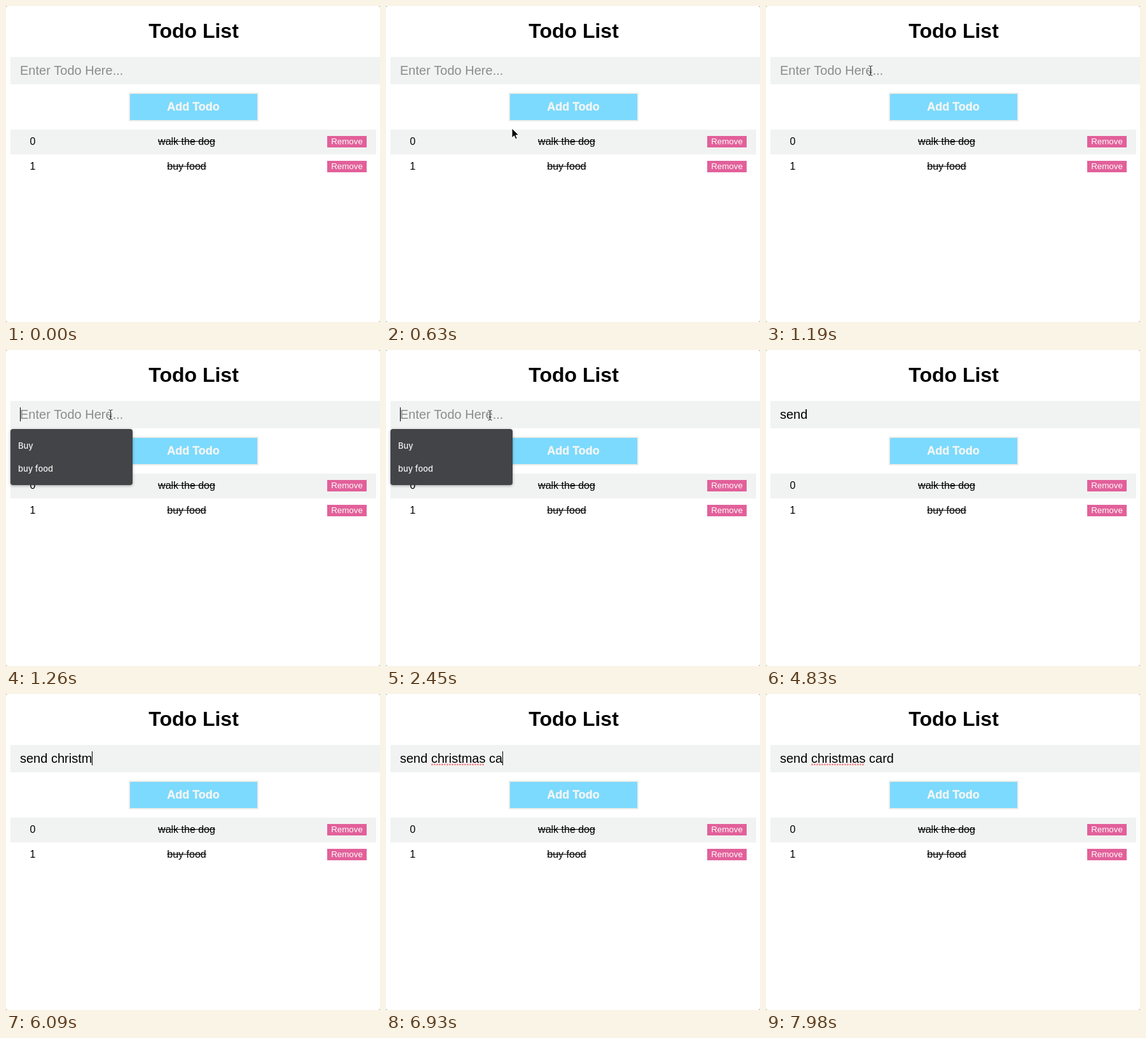
Animation of 588x496 px, one loop 8 s. Source, as an HTML page with a canvas:

```html
<!DOCTYPE html>
<html lang="en">
<head>
<meta charset="utf-8">
<title>Todo List</title>
<style>
  html, body { margin: 0; width: 100%; height: 100%; overflow: hidden; background: #fff; }
  canvas { display: block; }
</style>
</head>
<body>
<canvas id="stage" width="588" height="496"></canvas>
<script>
const ctx = document.getElementById('stage').getContext('2d');
const LOOP = 8000, STEP = 70;
const SANS = '"Liberation Sans", Arial, sans-serif';
const PALE = '#f1f3f2';
const TEXT = 'send christmas card';
const KEYS = [2520, 2660, 2800, 2870, 3270, 5320, 5460, 5600, 5740, 5880,
              5950, 6090, 6230, 6370, 6580, 6790, 6930, 7070, 7340];
const FOCUS = 1260, ENTER = 70, ARRIVE = 1190;

function rect(x, y, w, h, color) {
  ctx.fillStyle = color;
  ctx.fillRect(x, y, w, h);
}

function text(str, x, y, font, color = '#000', align = 'left') {
  ctx.font = font;
  ctx.fillStyle = color;
  ctx.textAlign = align;
  ctx.fillText(str, x, y);
}

function roundRect(x, y, w, h, r, color) {
  ctx.beginPath();
  ctx.roundRect(x, y, w, h, r);
  ctx.fillStyle = color;
  ctx.fill();
}

function row(index, label, y) {
  const font = '16px ' + SANS;
  if (index % 2 === 0) rect(7, y, 575, 39, PALE);
  text(index, 37.6, y + 24, font);
  text(label, 284, y + 24, font, '#000', 'center');
  const w = ctx.measureText(label).width;
  rect(284 - w / 2, y + 18, w, 1, '#000');
  rect(505, y + 10, 62, 18, '#e2609a');
  text('Remove', 536, y + 23, '13.333px ' + SANS, '#fff', 'center');
}

function page() {
  rect(0, 0, 588, 496, '#999');
  roundRect(0, 0, 588, 496, 3, '#fff');
  text('Todo List', 295, 50, 'bold 32px ' + SANS, '#000', 'center');
  rect(7, 80, 581, 43, PALE);
  rect(193, 136, 204, 45, '#e9ebea');
  rect(195, 138, 200, 41, '#7bdafd');
  text('Add Todo', 294.5, 164, 'bold 18px ' + SANS, '#f3f5f4', 'center');
  ctx.strokeStyle = '#f3f5f4';
  ctx.lineWidth = 0.4;
  ctx.strokeText('Add Todo', 294.5, 164);
  row(0, 'walk the dog', 194);
  row(1, 'buy food', 233);
}

function suggestions() {
  ctx.save();
  ctx.shadowColor = 'rgba(0,0,0,.35)';
  ctx.shadowBlur = 4;
  ctx.shadowOffsetY = 1;
  roundRect(7, 124, 192, 88, 4, '#434447');
  ctx.restore();
  const font = '500 13px Inter, sans-serif';
  text('Buy', 19, 155, font, '#f1f1f1');
  text('buy food', 19, 191, font, '#f1f1f1');
}

function field(t) {
  const font = '20px ' + SANS;
  const typed = KEYS.filter(k => k <= t).length;
  const value = TEXT.slice(0, typed);
  if (typed) text(value, 22, 108, font);
  else text('Enter Todo Here...', 22, 108, font, '#8c8c8c');

  // spelling marks appear once the word is finished
  if (typed > 14) {
    ctx.fillStyle = '#f4737a';
    for (let x = 72.5; x < 155; x += 4) {
      ctx.beginPath();
      ctx.arc(x, 110.8, 1.3, 0, 7);
      ctx.fill();
    }
  }

  const last = typed ? KEYS[typed - 1] : FOCUS;
  if (t >= last && Math.floor((t - last) / 500) % 2 === 0) {
    const w = typed ? ctx.measureText(value).width : 0;
    rect(Math.floor(22 + w), 90, 1, 22, '#000');
  }
}

function iBeam(x, y) {
  const path = new Path2D('M-3-7.5H-1.5L0-6.5 1.5-7.5H3M0-6.5V6.5M-3 7.5H-1.5L0 6.5 1.5 7.5H3M-2 2.5H2');
  ctx.save();
  ctx.translate(x + 0.5, y + 0.5);
  ctx.strokeStyle = 'rgba(255,255,255,.8)';
  ctx.lineWidth = 2.4;
  ctx.stroke(path);
  ctx.strokeStyle = '#111';
  ctx.lineWidth = 1;
  ctx.stroke(path);
  ctx.restore();
}

function arrow(x, y) {
  const path = new Path2D('M0 0V15L3.5 11.7 5.8 17 8.2 16 6 10.8H10.8Z');
  ctx.save();
  ctx.translate(x, y);
  ctx.fillStyle = '#000';
  ctx.fill(path);
  ctx.strokeStyle = '#fff';
  ctx.lineWidth = 1;
  ctx.stroke(path);
  ctx.restore();
}

function pointer(t) {
  if (t < ENTER || t >= KEYS[0]) return;
  if (t >= 1400) return iBeam(163, 102);
  const p = Math.min(1, (t - ENTER) / (ARRIVE - ENTER));
  const left = (1 - p) ** 2;
  const x = Math.round(164 + 136 * left), y = Math.round(101 + 365 * left);
  (y < 123 ? iBeam : arrow)(x, y);
}

function draw(now) {
  const t = Math.floor((now % LOOP) / STEP) * STEP;
  page();
  field(t);
  if (t >= FOCUS && t < KEYS[0]) suggestions();
  pointer(t);
}

const start = performance.now();
function frame() {
  draw(performance.now() - start);
  requestAnimationFrame(frame);
}
frame();
</script>
</body>
</html>
```
